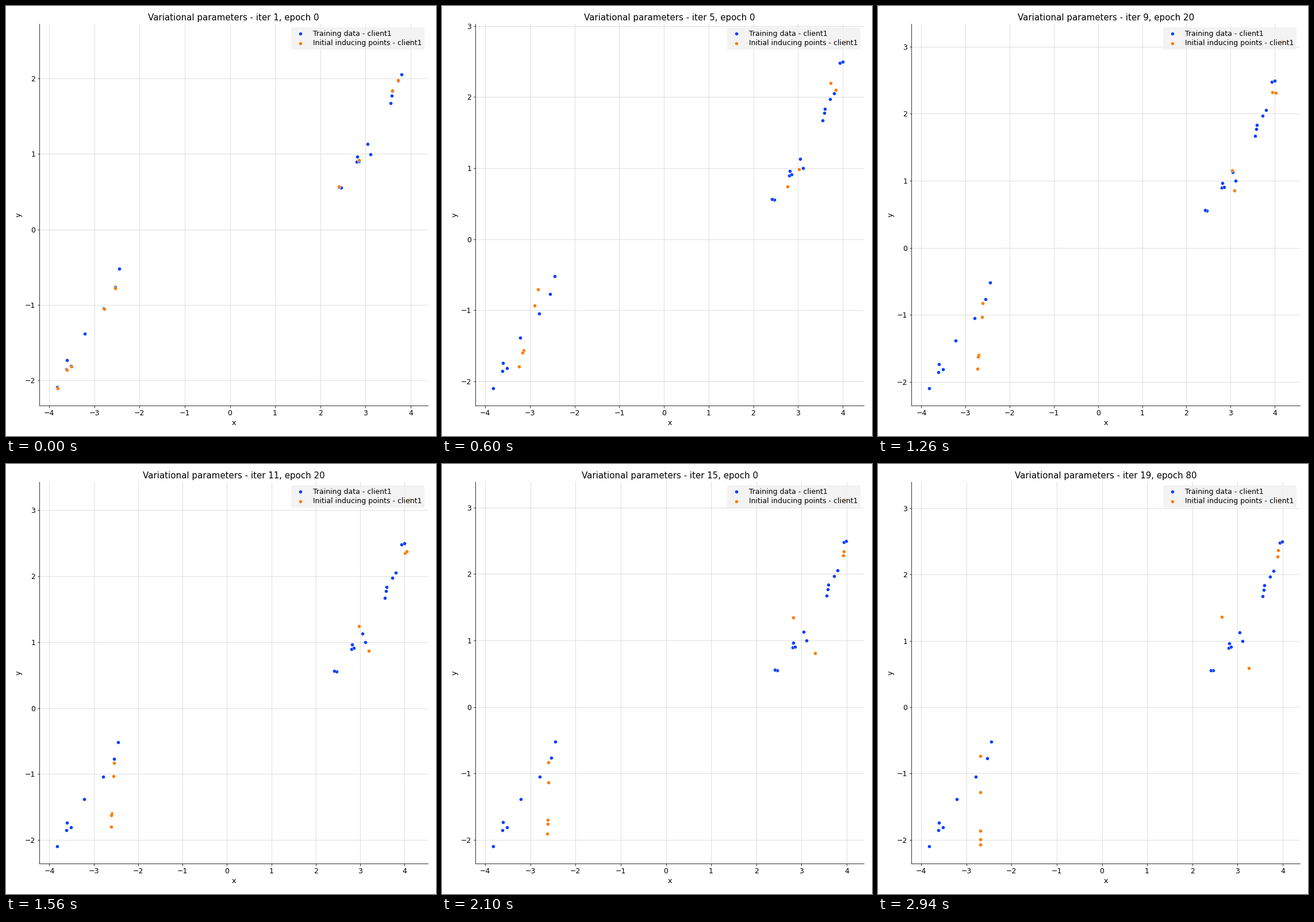
Recreate the animation shown at these times as a matplotlib script. Size 748 by 748 pixels, loop 3000 ms.

```python
import numpy as np
import matplotlib.pyplot as plt
from matplotlib.animation import FuncAnimation
from matplotlib.ticker import MultipleLocator

SIZE, DPI = 748, 72
FRAMES, INTERVAL = 50, 60
BLUE, ORANGE = "#023eff", "#ff7c00"

plt.rcParams.update({
    "font.family": "DejaVu Sans",
    "font.size": 12.5,
    "axes.axisbelow": True,
    "axes.spines.top": False,
    "axes.spines.right": False,
})

train = np.array([
    (-2.449, -.521), (-2.544, -.768), (-2.790, -1.046), (-3.219, -1.385),
    (-3.607, -1.737), (-3.518, -1.810), (-3.620, -1.853), (-3.825, -2.094),
    (2.468, .552), (2.417, .560), (2.800, .897), (2.856, .908),
    (2.818, .962), (3.110, .999), (3.047, 1.130), (3.556, 1.672),
    (3.588, 1.773), (3.596, 1.836), (3.721, 1.971), (3.804, 2.053),
    (3.937, 2.478), (3.995, 2.497),
])

# Inducing points start next to some of the training points
lower = train[[1, 2, 5, 6, 7]] + (.008, -.011)
near, far, mid_a, mid_b = train[[9, 11, 17, 18]] + (0, .008)

# Path of the topmost point, which drives the axis limits
TOP_STEPS = [0, 10, 16, 26, 35, 49]
TOP_X = [3.955, 4.084, 4.215, 4.132, 3.955, 3.920]
TOP_Y = [2.488, 2.786, 3.000, 3.168, 3.127, 3.138]


def ease(t, start, end):
    u = np.clip((t - start) / (end - start), 0, 1)
    return u * u * (3 - 2 * u)


def lower_cluster(t):
    """Shift the cluster, close it up sideways and squeeze it vertically."""
    center = lower.mean(axis=0)
    late = ease(t, 26, 52)
    shift = (.68 * ease(t, 0, 28) - .117 * ease(t, 26, 49),
             .207 * ease(t, 0, 10) - .06 * ease(t, 10, 16)
             - .21 * ease(t, 26, 46))
    scale = (np.exp(-t / 9), 1 - .265 * (ease(t, 0, 16) - late))
    pos = center + shift + (lower - center) * scale
    pos[:, 1] += late * np.array([.118, -.162, .02, -.068, .093])
    return pos


def middle_pair(t):
    a = near + (.9 * np.sin(t / 25), .3 * np.sin(np.pi * t / 50))
    b = far + (.2 * np.sin(np.pi * t / 33), .45 * ease(t, 0, 40))
    return np.array([a, b])


def upper_cluster(t):
    """Two points trail the topmost one, line up under it and trade heights."""
    top = np.array([np.interp(t, TOP_STEPS, TOP_X),
                    np.interp(t, TOP_STEPS, TOP_Y)])
    scale = (1 - .92 * ease(t, 10, 35), 1 + .42 * ease(t, 0, 30))
    swap = np.array([0, 2.5 * t / (t * t + 100)])
    start = (TOP_X[0], TOP_Y[0])
    return np.array([top + (mid_a - start) * scale + swap,
                     top + (mid_b - start) * scale - swap,
                     top])


def inducing(t):
    return np.vstack([lower_cluster(t), middle_pair(t), upper_cluster(t)])


def limits(values, margin=.05):
    lo, hi = values.min(), values.max()
    pad = margin * (hi - lo)
    return lo - pad, hi + pad


fig = plt.figure(figsize=(SIZE / DPI, SIZE / DPI), dpi=DPI, facecolor="white")
left, right, top, bottom = 58.2, 734.2, 30.9, 694.9
ax = fig.add_axes([left / SIZE, 1 - bottom / SIZE,
                   (right - left) / SIZE, (bottom - top) / SIZE])
ax.grid(alpha=.5)
ax.xaxis.set_major_locator(MultipleLocator(1))
ax.yaxis.set_major_locator(MultipleLocator(1))
ax.set_xlabel("x")
ax.set_ylabel("y")
title = ax.set_title("", fontsize=15)

dot = dict(s=36, edgecolors="white", linewidths=.48)
ax.scatter(*train.T, color=BLUE, label="Training data - client1", **dot)
points = ax.scatter(*inducing(0).T, color=ORANGE,
                    label="Initial inducing points - client1", **dot)
ax.legend(loc="upper right", facecolor="#f0f0f0", edgecolor="none",
          framealpha=.8, borderpad=.38, labelspacing=.3, handlelength=1.92,
          handletextpad=.77, borderaxespad=.48)


def update(step):
    pos = inducing(step)
    points.set_offsets(pos)
    everything = np.vstack([train, pos])
    ax.set_xlim(limits(everything[:, 0]))
    ax.set_ylim(limits(everything[:, 1]))
    rnd, part = divmod(step, 5)
    title.set_text(f"Variational parameters - iter {2 * rnd + 1}, "
                   f"epoch {20 * part}")
    return points, title


anim = FuncAnimation(fig, update, frames=FRAMES, interval=INTERVAL,
                     repeat=True, repeat_delay=0, blit=False)
plt.show()
```
